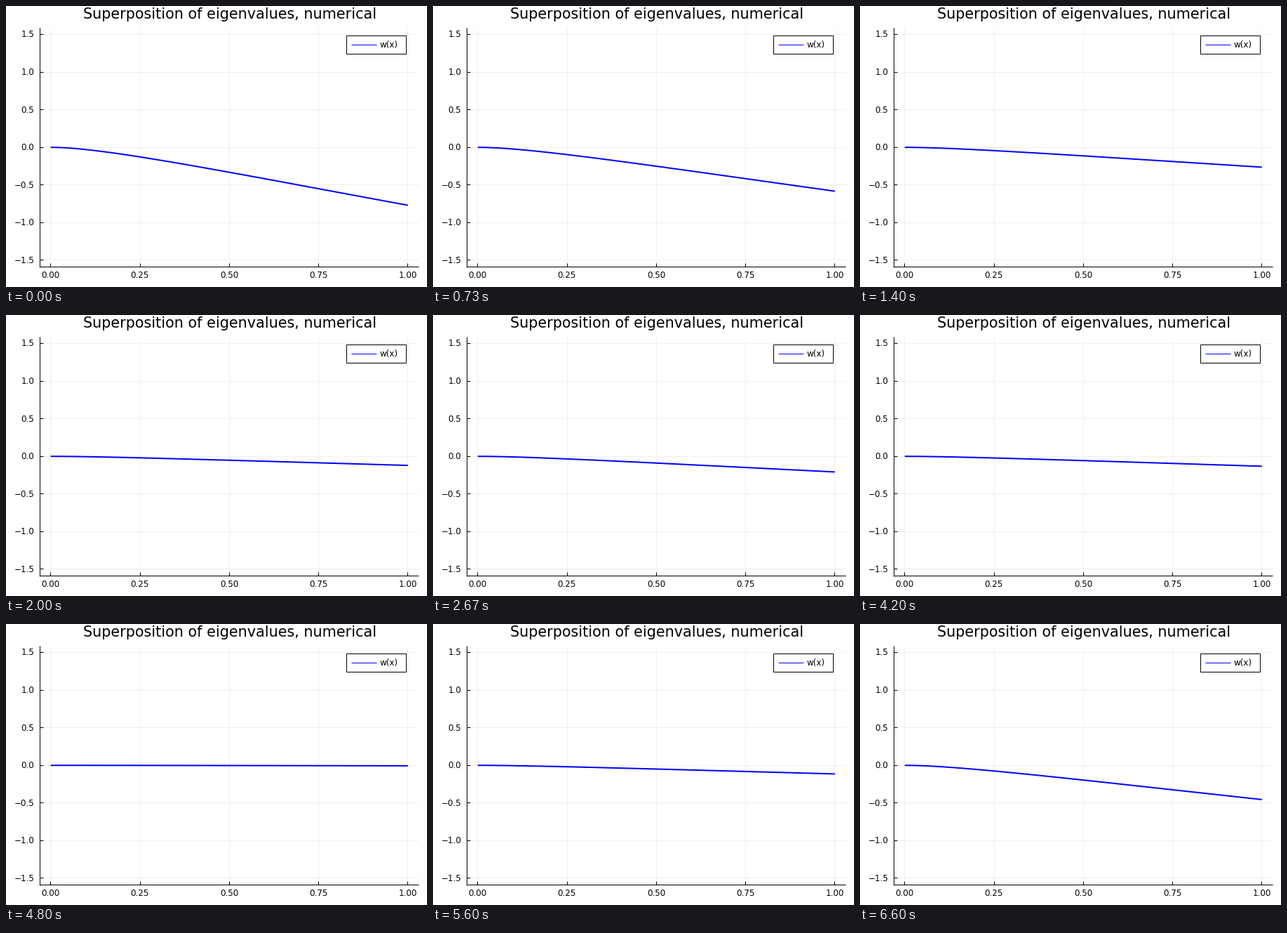
Write a matplotlib script that moves like this. It is 600 px wide and 400 px high and loops after 6.67 s.

```python
import numpy as np
import matplotlib.pyplot as plt
from matplotlib.animation import FuncAnimation
from matplotlib.patches import Rectangle

W, H, DPI = 600, 400, 100
PX = 72 / DPI  # points per pixel
LOOP, STEPS, SUB = 6670, 100, 3  # each step is held for SUB redraws
LEFT, RIGHT, TOP, BOTTOM = 48.5, 588.5, 31, 371.5

plt.rcParams["font.family"] = "DejaVu Sans"
fig = plt.figure(figsize=(W / DPI, H / DPI), dpi=DPI, facecolor="white")
ax = fig.add_axes([0, 0, 1, 1])
ax.set_xlim(0, W)
ax.set_ylim(H, 0)
ax.axis("off")


def px(x):
    return 63.8 + 509 * x


def py(y):
    return 201.2 - 107.1 * y


def rule(x0, y0, x1, y1, color="black", z=2):
    """One pixel wide straight line; the half pixel keeps it crisp."""
    ax.plot([x0 - 0.5, x1 - 0.5], [y0 - 0.5, y1 - 0.5], color=color,
            lw=PX, zorder=z, solid_capstyle="butt")


def label(x, y, s, size=11.93, ha="center"):
    ax.text(x, y, s, fontsize=size * PX, ha=ha, va="baseline", zorder=6)


# Axes, grid and ticks
for x in np.linspace(0, 1, 5):
    rule(px(x), TOP, px(x), BOTTOM, "#efefef", z=1)
    rule(px(x), BOTTOM - 5, px(x), BOTTOM)
    label(px(x) - 0.2, 387.2, f"{x:.2f}")
for y in np.linspace(-1.5, 1.5, 7):
    rule(LEFT, py(y), RIGHT, py(y), "#efefef", z=1)
    rule(LEFT, py(y), LEFT + 5, py(y))
    label(40.2, py(y) + 3.9, f"{y:.1f}".replace("-", "\u2212"), ha="right")
rule(LEFT, TOP, LEFT, BOTTOM + 0.5)
rule(LEFT, BOTTOM, RIGHT, BOTTOM)
label(318.7, 18, "Superposition of eigenvalues, numerical", 20.72)

# Legend
ax.add_patch(Rectangle((485, 42), 85, 26, fc="white", ec="black",
                       lw=PX, zorder=4))
rule(492, 55.5, 528, 55.5, "blue", z=5)
label(532.6, 59.4, "w(x)", ha="left")

# Beam clamped at x = 0
x = np.linspace(0, 1, 101)
shape = x**2 / (0.175 + 0.825 * x) + 0.04 * x**2 * (1 - x)
beam, = ax.plot(px(x), py(0 * x), color="blue", lw=2 * PX, zorder=3,
                solid_capstyle="butt", snap=False)

# Turning points of the free end: step and deflection
TURNS = [(0, -0.77), (30.5, -0.12), (49.5, -0.295), (75, 0.004),
         (102, -0.469)]


def tip(t):
    """Swing between turning points with cosine easing."""
    for (t0, a), (t1, b) in zip(TURNS, TURNS[1:]):
        if t <= t1:
            return a + (b - a) * (1 - np.cos(np.pi * (t - t0) / (t1 - t0))) / 2


def update(i):
    step = min((i + 1) // SUB, STEPS - 1)
    beam.set_ydata(py(tip(step) * shape))
    return (beam,)


anim = FuncAnimation(fig, update, frames=STEPS * SUB,
                     interval=LOOP / (STEPS * SUB),
                     repeat=True, repeat_delay=0)
plt.show()
```
